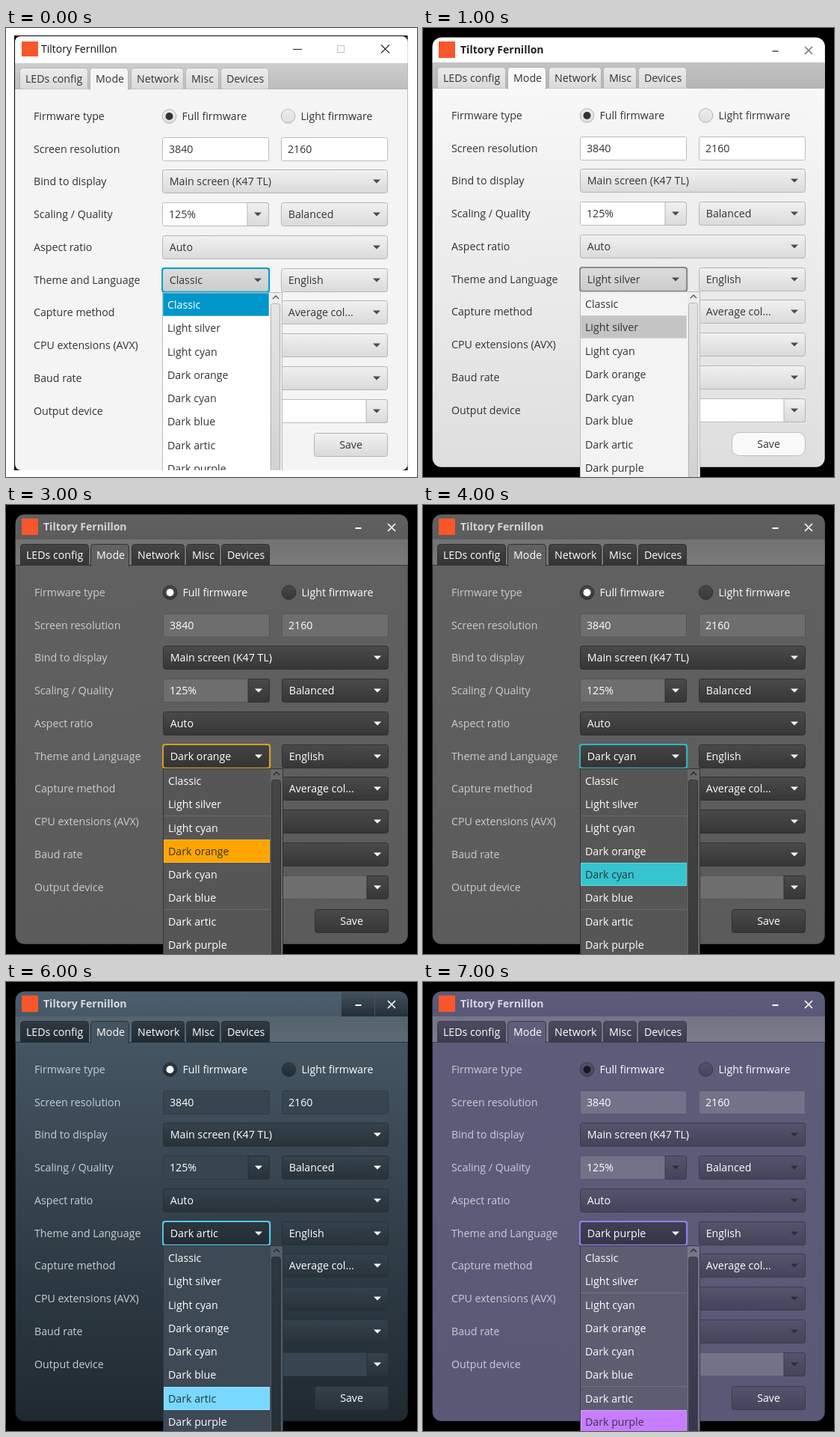
These frames come from a looping animation (550x600 px, 8000 ms). An HTML page:

```html
<!DOCTYPE html>
<html lang="en">
<head>
<meta charset="utf-8">
<style>
html, body { margin: 0; width: 100%; height: 100%; overflow: hidden; background: #000; }
svg { display: block; width: 550px; height: 600px; font: 14.2px "Open Sans", "Noto Sans", sans-serif; }
text { white-space: pre; }
</style>
</head>
<body>
<svg id="stage" viewBox="0 0 550 600"></svg>
<script>
const stage = document.getElementById('stage');
const STEP = 1000;

const names = ['Classic', 'Light silver', 'Light cyan', 'Dark orange', 'Dark cyan', 'Dark blue', 'Dark artic', 'Dark purple'];
const rowY = [117, 161, 204, 248, 292, 336, 379, 423, 467, 511];
const labels = ['Firmware type', 'Screen resolution', 'Bind to display', 'Scaling / Quality', 'Aspect ratio',
  'Theme and Language', 'Capture method', 'CPU extensions (AVX)', 'Baud rate', 'Output device'];
const tabs = [['LEDs config', 19, 111], ['Mode', 113, 165], ['Network', 168, 239], ['Misc', 241, 286], ['Devices', 288, 353]];

// Two colours separated by a space make a vertical gradient.
const light = {
  win: '#f4f4f4 #f4f4f4', bar: '#ffffff #ffffff', head: '#cdcdcd #bdbdbd', tab: '#ececec #d9d9d9', on: '#f4f4f4',
  btn: '#f1f1f1 #dadada', open: '#dcdcdc #cccccc', edge: '#b4b4b4', field: '#ffffff', fieldEdge: '#bcbcbc',
  label: '#333333', text: '#333333', title: '#222222', pop: '#ffffff', popEdge: '#bababa', pick: '#0096c9',
  pickText: '#ffffff', ring: '#039ed3', track: '#ededed', thumb: '#e4e4e4 #d0d0d0', arrow: '#4b4b4b', up: '#555555',
  radio: '#eeeeee #dddddd', dot: '#333333', glyph: '#555555', sep: 'none', caps: 'none none'
};
const dark = {
  win: '#616161 #5b5b5b', bar: '#606161 #5c5c5c', head: '#737373 #7a7a7a', tab: '#454545 #343434', on: '#616161',
  btn: '#4a4a4a #363636', open: '#434343 #343434', edge: '#303030', field: '#6e6e6e', fieldEdge: '#545454',
  label: '#cbcbcb', text: '#ffffff', title: '#d6d6d6', pop: '#565656', popEdge: '#343434', pick: '#ffa500',
  pickText: '#333333', ring: '#d0a02a', track: '#686868', thumb: '#464646 #383838', arrow: '#ffffff', up: '#262626',
  radio: '#484848 #383838', dot: '#ffffff', glyph: '#ffffff', sep: '#6a6a6a', caps: 'none none'
};
const themes = [
  light,
  { ...light, win: '#fbfbfb #dedede', head: '#c2c2c2 #b4b4b4', on: '#f9f9f9', pop: '#f3f3f3', pick: '#c4c4c4',
    pickText: '#333333', ring: '#8c8c8c', glyph: '#777777', roundSave: true },
  { ...light, win: '#fbfdff #d0dffc', bar: '#ffffff #fbfcff', head: '#bcc1ca #b0b6c1', tab: '#e1e5ed #cfd4de', on: '#f7faff',
    btn: '#e9edf5 #d2d7e2', open: '#d6dbe6 #c6ccd8', edge: '#b2b9c8', fieldEdge: '#b6c8e8', pop: '#edf2fa',
    popEdge: '#aab4c6', pick: '#93c3fc', pickText: '#333333', ring: '#4a92d6', track: '#e4e9f2', thumb: '#dce1ea #cbd1dc',
    glyph: '#ffffff', caps: '#e8f0ff #d3e1fb', roundSave: true },
  dark,
  { ...dark, pick: '#35c4d0', ring: '#35b4c0' },
  { ...dark, win: '#2b3c5e #283858', bar: '#2b3c5d #2a3a5a', head: '#3e4c66 #434f68', tab: '#232f49 #1a2438', on: '#2c3d5f',
    btn: '#25314b #1a2438', open: '#212c44 #1a2438', edge: '#18223a', field: '#3d4b68', fieldEdge: '#30405f',
    label: '#dde3ec', title: '#f0f3f8', pop: '#27354f', popEdge: '#1a253b', pick: '#1fa5ff', pickText: '#182338',
    ring: '#2d9bea', track: '#35445f', thumb: '#202c44 #1a2438', up: '#141c2c', radio: '#25314a #1c273d', sep: '#3b4962' },
  { ...dark, win: '#4a5b69 #1f2930', bar: '#4d5f6e #475966', head: '#54646f #5c6a72', tab: '#303a43 #222a31', on: '#45545f',
    btn: '#35424c #283239', open: '#2b363f #222b32', edge: '#273139', field: '#374550', fieldEdge: '#2f3b45',
    label: '#c8cfd4', title: '#d5dce1', pop: '#3d4954', popEdge: '#2a343c', pick: '#78d8ff', pickText: '#27333c',
    ring: '#55c6ee', track: '#515e69', thumb: '#2d3740 #242d34', up: '#1c242a', radio: '#303b44 #232c33',
    caps: '#435460 #242e36', sep: 'none' },
  { ...dark, win: '#5d5c7a #5a5975', bar: '#5c5b79 #59587a', head: '#757486 #7d7c8c', tab: '#4c4b60 #3c3b4e', on: '#5e5d7a',
    btn: '#55546d #444359', open: '#403f55 #353447', edge: '#3c3b50', field: '#737289', fieldEdge: '#5b5a74',
    label: '#cccbd8', title: '#d8d7e3', pop: '#5d5c71', popEdge: '#3c3b4e', pick: '#c77dff', pickText: '#3b3352',
    ring: '#9180f2', track: '#77768a', thumb: '#454459 #373649', up: '#2b2a38', radio: '#55546b #454459', dot: '#181826',
    arrow: '#2e2d3c', openArrow: '#ffffff', sep: '#717085' }
];

const box = (x, y, w, h, fill, edge = 'none', r = 0, sw = 1) =>
  `<rect x="${x}" y="${y}" width="${w}" height="${h}" rx="${r}" fill="${fill}" stroke="${edge}" stroke-width="${sw}"/>`;
const path = (d, fill, edge = 'none', sw = 1) => `<path d="${d}" fill="${fill}" stroke="${edge}" stroke-width="${sw}"/>`;
const text = (s, x, cy, fill, more = '') => `<text x="${x}" y="${cy + 5}" fill="${fill}" ${more}>${s}</text>`;
const grad = (id, pair) => {
  const [a, b] = pair.split(' ');
  return `<linearGradient id="${id}" x2="0" y2="1"><stop stop-color="${a}"/><stop offset="1" stop-color="${b}"/></linearGradient>`;
};

function arrow(x, cy, fill) {
  return path(`M${x - 5} ${cy - 2.5}h10l-5 5z`, fill);
}

function combo(t, x, cy, w, s, fill = 'url(#btn)') {
  return box(x + .5, cy - 15.5, w - 1, 31, fill, t.edge, 3) +
    text(s, x + 9.7, cy, t.text) + arrow(x + w - 15, cy, t.arrow);
}

function field(t, x, cy, w, s) {
  return box(x + .5, cy - 15.5, w - 1, 31, t.field, t.fieldEdge, 2) + text(s, x + 9, cy, t.text);
}

function editCombo(t, x, cy, w, s) {
  const bx = x + w - 29;
  return field(t, x, cy, w, s) +
    path(`M${bx} ${cy - 15.5}h25.5q3 0 3 3v25q0 3 -3 3h-25.5z`, 'url(#btn)', t.edge) + arrow(x + w - 15, cy, t.arrow);
}

function radio(t, x, on, s) {
  return `<circle cx="${x}" cy="117" r="9.3" fill="url(#radio)" stroke="${t.edge}"/>` +
    (on ? `<circle cx="${x}" cy="117" r="5" fill="${t.dot}"/>` : '') + text(s, x + 17, 117, t.text);
}

function header(t) {
  const strip = box(12, 46, 526, 35, 'url(#head)') + box(12, 80, 526, 1, t.edge);
  return strip + tabs.map(([s, a, b], i) => {
    const on = i === 1, end = on ? 82 : 80.5;
    const d = `M${a + .5} ${end}V56.5q0 -4 4 -4H${b - 4.5}q4 0 4 4V${end}`;
    return path(d, on ? t.on : 'url(#tab)', t.edge) + text(s, a + 8, 67, t.text);
  }).join('');
}

function form(t, n) {
  const y = rowY;
  let s = labels.map((l, i) => text(l, 38, y[i], t.label)).join('');
  s += radio(t, 219.5, true, 'Full firmware') + radio(t, 378.5, false, 'Light firmware');
  s += field(t, 210, y[1], 143, '3840') + field(t, 369, y[1], 143, '2160');
  s += combo(t, 210, y[2], 302, 'Main screen (K47 TL)');
  s += editCombo(t, 210, y[3], 143, '125%') + combo(t, 369, y[3], 143, 'Balanced');
  s += combo(t, 210, y[4], 302, 'Auto');
  s += combo({ ...t, edge: t.ring, arrow: t.openArrow || t.arrow }, 210, y[5], 143, names[n], 'url(#open)');
  s += box(210, 320, 143.3, 31.7, 'none', t.ring, 3, 1.9);
  s += combo(t, 369, y[5], 143, 'English') + combo(t, 369, y[6], 143, 'Average col...');
  s += combo(t, 210, y[7], 302, '') + combo(t, 210, y[8], 302, '') + editCombo(t, 210, y[9], 302, '');
  s += box(413.5, 540.5, 98, 31, t.roundSave ? t.on : 'url(#btn)', t.roundSave ? t.fieldEdge : t.edge, t.roundSave ? 10 : 3);
  return s + text('Save', 462.5, 556, t.text, 'text-anchor="middle"');
}

function popup(t, n) {
  const top = i => Math.round(353 + 31.25 * i);
  let s = box(210.5, 352.5, 160, 260, t.pop, t.popEdge) + box(354, 353, 16, 260, t.track);
  s += [2, 6].map(i => box(211, top(i) - 1, 142, 1, t.sep)).join('');
  s += box(211, top(n), 142, 31, t.pick) + box(211.5, top(n) + .5, 141, 30, 'none', '#ffffff40');
  s += names.map((l, i) => text(l, 217, Math.round(369 + 31.25 * i), i === n ? t.pickText : t.text)).join('');
  s += box(355.5, 367.5, 12, 260, 'url(#thumb)', t.edge, 3);
  return s + path('M358 361l4 -4 4 4', 'none', t.up, 1.3);
}

function caption(t, classic) {
  const logo = box(21, 18, 22, classic ? 20 : 22, '#f8572c');
  if (classic) {
    return logo + text('Tiltory Fernillon', 47, 28, '#111', 'font-size="14"') +
      path('M384 28.5h12M502 22.5l11 11M513 22.5l-11 11', 'none', '#222', 1.2) + box(443.5, 23.5, 9, 9, 'none', '#c4c4c4');
  }
  const caps = t.caps.startsWith('#') ? box(449, 12, 89, 34, 'url(#caps)') + box(493, 12, 1, 34, t.on) : '';
  return caps + logo + text('Tiltory Fernillon', 50, 28.5, t.title, 'font-weight="700" font-size="14"') +
    path('M467.5 31h8', 'none', t.glyph, 2) + path('M511 25l10 10M521 25l-10 10', 'none', t.glyph, 1.6);
}

function draw(n) {
  const t = themes[n], classic = n === 0;
  const defs = ['win', 'bar', 'head', 'tab', 'btn', 'open', 'thumb', 'radio', 'caps'].map(k => grad(k, t[k])).join('');
  const frame = classic ? box(12, 11, 525.5, 580, '#000', 'none', 8) : box(12.7, 12.7, 525, 574, '#000', 'none', 12);
  const shift = classic ? 'translate(-1 1)' : '';
  const back = classic ? box(0, 0, 550, 600, '#fff') + box(11, 10, 526.5, 581, '#000') : box(0, 0, 550, 600, '#000');
  const edgeY = classic ? 591 : 600;
  stage.innerHTML = `<defs>${defs}<clipPath id="frame">${frame}</clipPath>` +
    `<clipPath id="low">${box(0, 0, 550, edgeY, '#000')}</clipPath></defs>` + back +
    `<g clip-path="url(#frame)">${box(11, 10, 528, 581, 'url(#win)')}${box(11, 10, 528, 37, 'url(#bar)')}` +
    `${caption(t, classic)}<g transform="${shift}">${header(t)}${form(t, n)}</g></g>` +
    `<g clip-path="url(#low)"><g transform="${shift}">${popup(t, n)}</g></g>`;
}

let shown = -1;
function tick(now) {
  const n = Math.floor(now / STEP) % themes.length;
  if (n !== shown) draw(shown = n);
  requestAnimationFrame(tick);
}
tick(performance.now());
</script>
</body>
</html>
```
